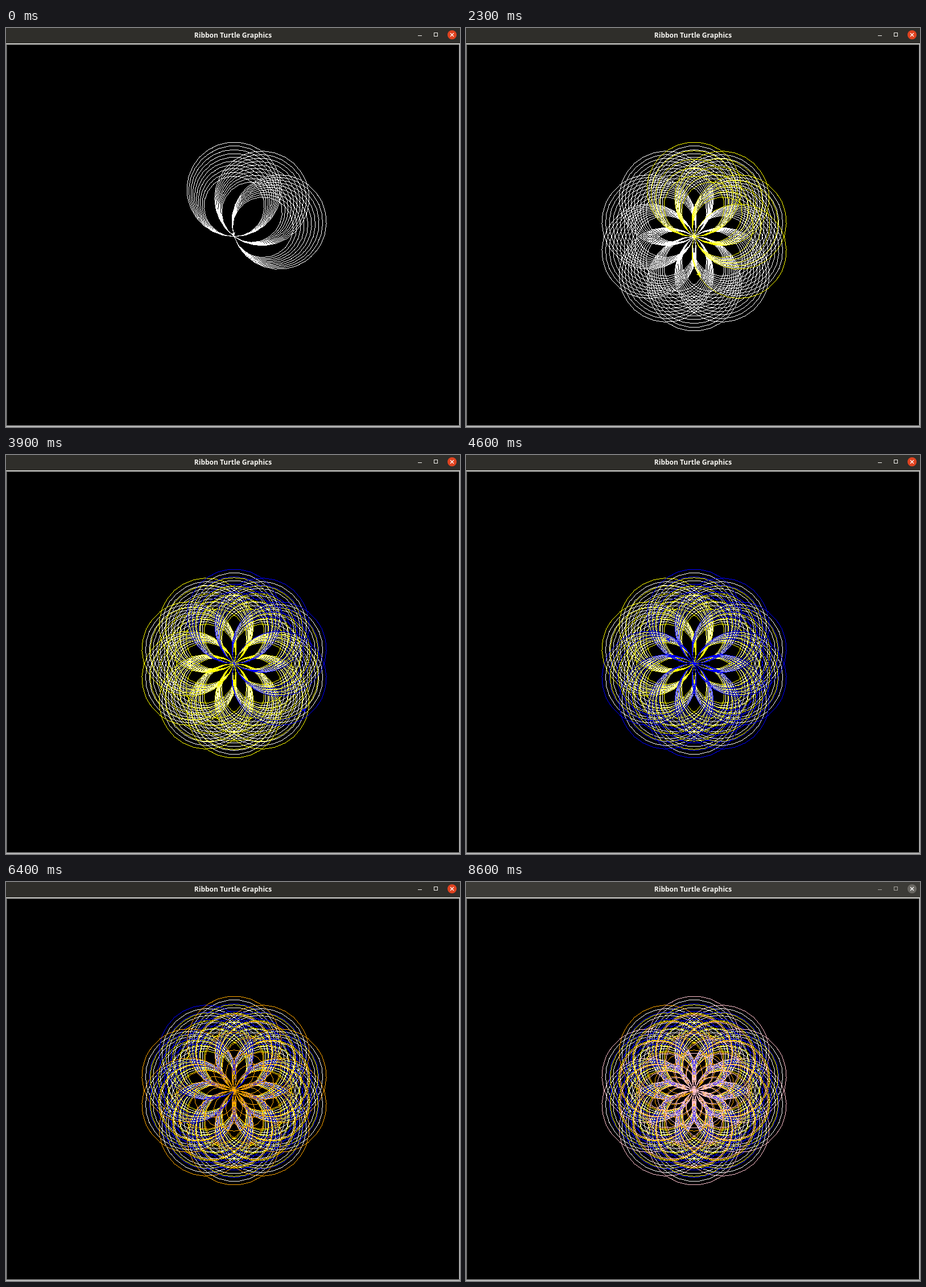
Write an HTML page with a canvas that moves like this. It is 798x702 px and loops after 8.7 s.

```html
<!DOCTYPE html>
<html lang="en">
<head>
<meta charset="utf-8">
<style>
  html, body { margin: 0; width: 100%; height: 100%; overflow: hidden; background: #000; }
  canvas { position: absolute; left: 0; top: 0; }
  h1 {
    position: absolute; left: 0; top: 0; width: 798px; margin: 0;
    font: bold 12px/25px "Open Sans", "Noto Sans", sans-serif;
    text-align: center; color: #f4f3ef;
  }
</style>
</head>
<body>
<canvas id="stage" width="798" height="702"></canvas>
<h1>Ribbon Turtle Graphics</h1>
<script>
const WIDTH = 798, HEIGHT = 702, LOOP = 8700, STEP = 100;
const CENTER_X = 401, CENTER_Y = 367, SCALE = 798 / 960;
const ctx = document.getElementById('stage').getContext('2d');
const image = ctx.createImageData(WIDTH, HEIGHT);
const pixels = new Uint32Array(image.data.buffer);
const BLACK = 0xff000000;

// Each pass draws ten groups of shrinking circles, turning 36° after each group.
const passes = [
  { color: '#ffffff', start: -765, groupTime: 255, shrink: 4, circles: 10 },
  { color: '#ffff00', start: 1785, groupTime: 158, shrink: 9, circles: 5 },
  { color: '#0000ff', start: 3365, groupTime: 158, shrink: 8, circles: 4 },
  { color: '#ffa500', start: 4975, groupTime: 173, shrink: 19, circles: 4 },
  { color: '#ffc0cb', start: 6705, groupTime: 211, shrink: 20, circles: 4 }
];

const sidesOf = radius => Math.floor(11 + radius / 6);

for (const pass of passes) {
  const [r, g, b] = [1, 3, 5].map(i => parseInt(pass.color.slice(i, i + 2), 16));
  pass.pixel = (BLACK | b << 16 | g << 8 | r) >>> 0;
  pass.radii = Array.from({ length: pass.circles }, (_, i) => 100 - i * pass.shrink);
  pass.sides = pass.radii.reduce((sum, radius) => sum + sidesOf(radius), 0);
}

function plotLine(x0, y0, x1, y1, pixel) {
  const count = Math.max(1, Math.ceil(Math.max(Math.abs(x1 - x0), Math.abs(y1 - y0))));
  for (let i = 0; i <= count; i++) {
    const x = Math.floor(x0 + (x1 - x0) * i / count);
    const y = Math.floor(y0 + (y1 - y0) * i / count);
    pixels[y * WIDTH + x] = pixel;
  }
}

// Draws up to `budget` sides of one group and returns the pen's resting pose.
function drawGroup(pass, startHeading, budget) {
  let x = CENTER_X, y = CENTER_Y, heading = startHeading;
  for (const radius of pass.radii) {
    const sides = sidesOf(radius), turn = 2 * Math.PI / sides;
    const length = 2 * radius * SCALE * Math.sin(turn / 2);
    x = CENTER_X;
    y = CENTER_Y;
    heading = startHeading + turn / 2;
    for (let i = 0; i < sides; i++, heading += turn) {
      if (budget-- <= 0) return { x, y, heading };
      const nextX = x + length * Math.cos(heading);
      const nextY = y - length * Math.sin(heading);
      plotLine(x, y, nextX, nextY, pass.pixel);
      x = nextX;
      y = nextY;
    }
  }
  return { x, y, heading: startHeading };
}

function drawPen({ x, y, heading }, color) {
  ctx.save();
  ctx.translate(x, y);
  ctx.rotate(-heading);
  ctx.scale(SCALE, SCALE);
  ctx.fillStyle = color;
  ctx.beginPath();
  ctx.moveTo(0, 0);
  ctx.lineTo(-9, 5);
  ctx.lineTo(-7, 0);
  ctx.lineTo(-9, -5);
  ctx.fill();
  ctx.restore();
}

function rect(color, x, y, w, h) {
  ctx.fillStyle = color;
  ctx.fillRect(x, y, w, h);
}

function drawWindow(focused) {
  rect(focused ? '#2f2e2a' : '#3c3b37', 0, 0, WIDTH, 27);
  rect('#e6e6e2', 0, 27, WIDTH, 1);
  rect('#a0a09c', 0, 28, WIDTH, 1);
  rect('#484848', 0, 29, WIDTH, 1);
  rect('#8c8c8c', 0, 28, 1, HEIGHT - 28);
  rect('#444', 1, 29, 1, HEIGHT - 29);
  rect('#777', 796, 29, 1, HEIGHT - 29);
  rect('#d0d0d0', 797, 28, 1, HEIGHT - 28);
  rect('#777', 0, 699, WIDTH, 1);
  rect('#b4b4b4', 0, 700, WIDTH, 2);

  const icon = focused ? '#f0efeb' : '#a5a39d';
  rect(icon, 724, 13, 7, 1);
  ctx.lineWidth = 1;
  ctx.strokeStyle = icon;
  ctx.strokeRect(752.5, 8.5, 6, 6);

  ctx.fillStyle = focused ? '#e04320' : '#6a6863';
  ctx.beginPath();
  ctx.arc(784, 12, 8, 0, 2 * Math.PI);
  ctx.fill();
  ctx.strokeStyle = '#fff';
  ctx.lineWidth = 1.3;
  ctx.beginPath();
  ctx.moveTo(781, 9);
  ctx.lineTo(787, 15);
  ctx.moveTo(787, 9);
  ctx.lineTo(781, 15);
  ctx.stroke();
}

function render(time) {
  pixels.fill(BLACK);
  let pen, penColor;
  for (const pass of passes) {
    const progress = Math.min(10, (time - pass.start) / pass.groupTime);
    for (let group = 0; group < progress; group++) {
      const budget = Math.floor(Math.min(1, progress - group) * pass.sides);
      pen = drawGroup(pass, -group * Math.PI / 5, budget);
      penColor = pass.color;
    }
  }
  ctx.putImageData(image, 0, 0);
  drawPen(pen, penColor);
  drawWindow(time < 8500);
}

const origin = performance.now();
let shown = -1;

function tick() {
  const elapsed = (performance.now() - origin) % LOOP;
  const time = Math.floor(elapsed / STEP) * STEP;
  if (time !== shown) render(shown = time);
  requestAnimationFrame(tick);
}
tick();
</script>
</body>
</html>
```
